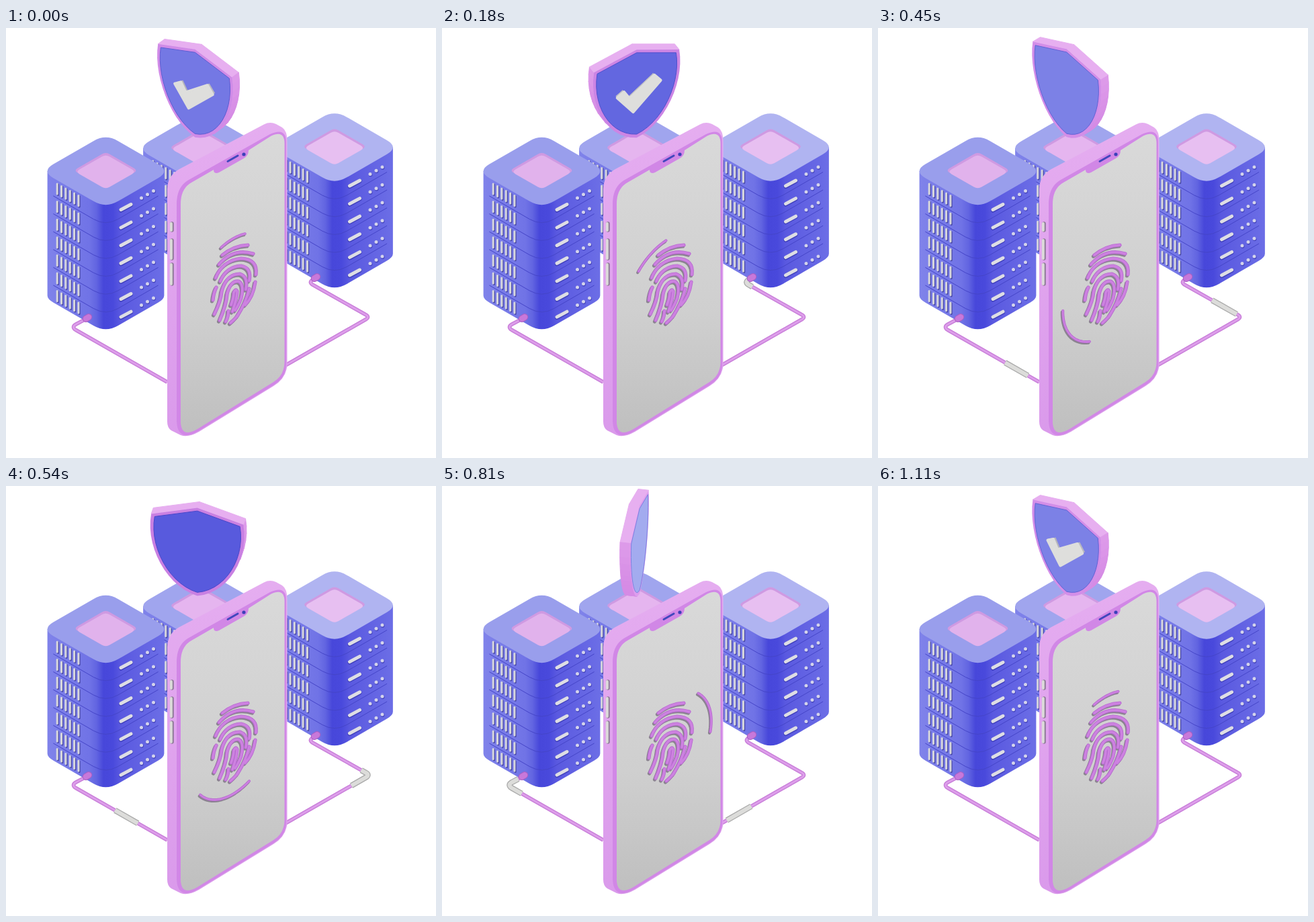
Recreate the animation shown at these times as an HTML page. Size 640 by 640 pixels, loop 1.14 s.

```html
<!DOCTYPE html>
<html lang="en">
<head>
<meta charset="utf-8">
<title>Secure phone and servers</title>
<style>
html, body { margin: 0; width: 100%; height: 100%; overflow: hidden; background: #fff; }
svg { display: block; width: 100vw; height: 100vh; }
</style>
</head>
<body>
<svg id="stage" viewBox="0 0 640 640" fill="none" stroke-linejoin="round">
  <defs>
    <linearGradient id="body">
      <stop offset="0" stop-color="#8083ea"/><stop offset=".36" stop-color="#7073e6"/>
      <stop offset=".42" stop-color="#6265e1"/><stop offset=".48" stop-color="#4747da"/>
      <stop offset=".56" stop-color="#4949dc"/><stop offset=".63" stop-color="#5a59e0"/>
      <stop offset="1" stop-color="#6c6ee6"/>
    </linearGradient>
    <linearGradient id="screen" x2="0" y2="1">
      <stop offset="0" stop-color="#d9d9d9"/><stop offset=".6" stop-color="#cfcfcf"/>
      <stop offset="1" stop-color="#bfbfbf"/>
    </linearGradient>
    <linearGradient id="side" x2="0" y2="1">
      <stop offset="0" stop-color="#e5adf0"/><stop offset="1" stop-color="#da9aeb"/>
    </linearGradient>
  </defs>
  <g id="towers"></g>
  <g id="cables"></g>
  <g id="phone"></g>
  <g id="print"></g>
  <g id="shield"></g>
</svg>
<script>
const LOOP = 1140, STEP = 30, ISO = 0.577;
const $ = id => document.getElementById(id);
const tag = (name, attrs) =>
  `<${name} ${Object.entries(attrs).map(([k, v]) => `${k}="${v}"`).join(' ')}/>`;
const fill = (d, color) => tag('path', { d, fill: color });
const line = (d, color, width, cap = 'round') =>
  tag('path', { d, stroke: color, 'stroke-width': width, 'stroke-linecap': cap });

// ---- server towers ----
function diamond(cx, cy, a, t) {
  const b = a * ISO;
  const c = [[cx - a, cy], [cx, cy - b], [cx + a, cy], [cx, cy + b]];
  const toward = (p, q) => [p[0] + (q[0] - p[0]) * t, p[1] + (q[1] - p[1]) * t];
  return c.map((p, i) =>
    `${i ? 'L' : 'M'}${toward(p, c[(i + 3) % 4])}Q${p} ${toward(p, c[(i + 1) % 4])}`).join('') + 'Z';
}

function tower(cx, cy, layers, topColor, pink) {
  const a = 96, b = a * ISO, t = 0.19, w = a * (1 - t / 2), pitch = 26.6;
  const h = layers * pitch - 1;
  let s = fill(diamond(cx, cy + h, a, t) + `M${cx - w},${cy}H${cx + w}V${cy + h}H${cx - w}Z`, 'url(#body)');
  for (let k = 1; k < layers; k++) {
    const y = cy + k * pitch;
    const seam = `M${cx - a * (1 - t)},${y + b * t}L${cx - a * t},${y + b * (1 - t)}Q${cx},${y + b} ` +
      `${cx + a * t},${y + b * (1 - t)}L${cx + a * (1 - t)},${y + b * t}`;
    s += line(seam, '#4545c8', 1);
  }
  for (let k = 0; k < layers; k++) {
    const y = cy + k * pitch;
    for (let i = 0; i < 6; i++) {
      const x = cx - 72.3 + i * 6.35, top = y + 19 + i * 3.5;
      s += line(`M${x + 1.3},${top + 1}v15.500`, '#4a4aa6', 3) + line(`M${x},${top}v15`, '#d6d6dc', 3);
    }
    s += line(`M${cx + 22.5},${y + 58.5}l15,-8`, '#3f3fba', 6) +
      line(`M${cx + 22.5},${y + 57.5}l15,-8`, '#dedee4', 5);
    for (let i = 0; i < 3; i++) {
      const x = cx + 53 + i * 9, dy = y + 40 - i * 5.3;
      s += tag('circle', { cx: x + 0.6, cy: dy + 1, r: 2.8, fill: '#4343bc' }) +
        tag('circle', { cx: x, cy: dy, r: 2.5, fill: '#d4d4ec' });
    }
  }
  return s + fill(diamond(cx, cy, a, t), topColor) +
    fill(diamond(cx, cy - 1, 48, 0.13), '#cf9ae2') +
    fill(diamond(cx, cy + 1, 45, 0.13), pink);
}
$('towers').innerHTML =
  tower(291, 179, 5, '#a0a5ee', '#e5b5ef') +
  tower(148.5, 213, 7, '#999eec', '#e1b2ec') +
  tower(489, 177.5, 6, '#b0b4f1', '#e7bff1');

// ---- cables with travelling pulses ----
const pulses = [
  { d: 'M240,527L104,449.5Q97,445 104,441L121,432', from: -47.5, span: 256, size: 39 },
  { d: 'M464,370L456,375Q450,379 458,383L535,426.500Q542,430 535,434L417,501.500', from: -14, span: 298, size: 42 }
];
const plug = (x, y) => {
  const d = `M${x - 2},${y + 1.2}L${x + 2},${y - 1.2}`;
  return line(d, '#a95fc4', 10.5) + line(d, '#c878da', 8.5);
};
$('cables').innerHTML =
  pulses.map(p => line(p.d, '#c77bd8', 5.6, 'butt') + line(p.d, '#dd9eea', 3, 'butt')).join('') +
  plug(121, 431.5) +
  pulses.map(p => `<g class="pulse">${line(p.d, '#a9a9a9', 8.5, 'butt')}${line(p.d, '#dcdcda', 6, 'butt')}</g>`).join('') +
  plug(461, 371.5);
const pulseNodes = [...document.querySelectorAll('.pulse')];

// ---- phone ----
const shell = 'M240,240Q240,220 258,210L384,143.5Q393,139 402,143L411,148Q418.500,153 418.500,168' +
  'V500Q418,521 398,533L287,601Q271,610 260,606L246,599Q240,595 240,586Z';
const front = 'M254,262Q254,236 272,226L393,158Q417,147 417,170V500Q417,520 399,531L286,600Q256,617 254,586Z';
const glass = 'M260,262Q260,239 276,230L309,211Q309,218 317,215L354,194Q361,190 361,182' +
  'L394,161Q414.500,151 414.500,172V498Q414,517 398,527L288,595Q262,612 260,588Z';
const button = (y1, y2) => line(`M247,${y1}V${y2}`, '#8d7a96', 5.5) + line(`M245.800,${y1}V${y2}`, '#dcdad9', 4);
$('phone').innerHTML =
  fill(shell, 'url(#side)') + fill(front, '#d187e6') + fill(glass, 'url(#screen)') +
  button(291, 301) + button(316, 343) + button(352, 381) +
  line('M330,198.500L345,190', '#4247bd', 3) +
  tag('circle', { cx: 354, cy: 188, r: 2.6, fill: '#3c40b8' });

// ---- fingerprint ----
const ridges = [
  'M322,338Q339,324 360,323',
  'M317,352Q338,327 368,336',
  'M312,372Q322,346 350,343Q375,344 372,367',
  'M308,405Q309,394 313,386',
  'M319,377Q328,355 350,354Q366,357 362,376',
  'M310,426Q320,406 321,392Q328,366 348,366Q361,370 357,389',
  'M318,435Q328,412 329,396Q334,376 346,377Q355,381 350,402Q346,413 341,420',
  'M327,437Q331,430 331,421',
  'M335,412Q339,401 339,394Q342,387 344,392Q344,402 337,422',
  'M371,378Q368,400 356,412',
  'M362,388Q358,407 344,429',
  'M334,439Q340,434 344,429'
].join('');
const relief = (d, width) =>
  `<g transform="translate(-1.500 2)">${line(d, '#8b8390', width)}</g>` +
  line(d, '#b86ad1', width) + line(d, '#cd82e0', width - 1.8);
$('print').innerHTML = relief(ridges, 5.2) + `<g id="orbit">${relief('', 4)}</g>`;
const orbitNodes = $('orbit').querySelectorAll('path');

function orbitPath(p, ease) {
  const mid = 360 * (0.9 * ease + 0.1 * p);
  const len = 33 + 41 * Math.sin(Math.PI * p) ** 2;
  const pts = [];
  for (let i = 0; i <= 20; i++) {
    const a = (mid + len * (i / 20 - 0.5)) * Math.PI / 180;
    const u = -72.5 * Math.sin(a), v = -72.5 * Math.cos(a);
    pts.push(`${(338 + u * 0.866).toFixed(2)},${(386 + v - u * 0.5).toFixed(2)}`);
  }
  return 'M' + pts.join('L');
}

// ---- shield ----
const turns = [[0, 38], [180, -25], [360, -102], [540, -168.5], [690, -221.5], [930, -291], [1110, -316]];
function turnKey(i) {
  const n = turns.length, lap = Math.floor(i / n), [t, a] = turns[i - lap * n];
  return [t + lap * LOOP, a - lap * 360];
}
function turnAt(t) {
  let i = turns.length - 1;
  while (turns[i][0] > t) i--;
  const [a, b, c, d] = [i - 1, i, i + 1, i + 2].map(turnKey);
  const slope = (p, q) => (q[1] - p[1]) / (q[0] - p[0]);
  const h = c[0] - b[0], x = (t - b[0]) / h, x2 = x * x, x3 = x2 * x;
  return (2 * x3 - 3 * x2 + 1) * b[1] + (x3 - 2 * x2 + x) * h * slope(a, c) +
    (3 * x2 - 2 * x3) * c[1] + (x3 - x2) * h * slope(b, d);
}

const half = [];
for (let i = 0; i <= 14; i++) {
  const s = i / 14, r = 1 - s;
  half.push([70 * r ** 3 + 3 * 79 * r * r * s + 3 * 47 * r * s * s,
    -45 * r ** 3 + 3 * 4 * r * r * s + 3 * 60 * r * s * s + 69 * s ** 3]);
}
const outline = [[0, -62], ...half, ...half.slice(0, -1).reverse().map(([u, v]) => [-u, v])];
const inset = outline.map(([u, v]) => [u * 0.925, v * 0.925]);
const tick = [[-34, -1], [-23, -7], [-14, 5], [27, -20], [37, -10], [-8, 26]];

const mix = (a, b, k) => `rgb(${a.map((x, i) => Math.round(x + (b[i] - x) * k))})`;
const poly = pts => 'M' + pts.map(p => p.map(x => x.toFixed(2)).join()).join('L') + 'Z';

function drawShield(deg) {
  const a = deg * Math.PI / 180, c = Math.cos(a), s = Math.sin(a);
  const facing = c > 0 ? 1 : -1;
  const at = w => ([u, v]) => [286.3 + u * c - w * s, 90 + v + (u * s + w * c) * ISO];
  function extrude(shape, w0, w1, shade) {
    const back = shape.map(at(w0)), face = shape.map(at(w1));
    return shape.map((p, i) => {
      const j = (i + 1) % shape.length, q = shape[j];
      const [A, B, C] = [face[i], face[j], back[i]];
      const area = (B[0] - A[0]) * (C[1] - A[1]) - (B[1] - A[1]) * (C[0] - A[0]);
      if (area * facing >= 0) return '';
      const up = (q[0] - p[0]) / Math.hypot(q[0] - p[0], q[1] - p[1]);
      const color = shade(up);
      return tag('path', { d: poly([A, B, back[j], C]), fill: color, stroke: color, 'stroke-width': 1 });
    }).join('');
  }
  const w = 8 * facing;
  const pinkShade = up => mix([214, 139, 229], [233, 180, 241], Math.max(0, Math.min(1, 0.3 + up * 0.6)));
  let svg = extrude(outline, -w, w, pinkShade) +
    fill(poly(outline.map(at(w))), mix([200, 127, 226], [222, 158, 238], s * s)) +
    tag('path', { d: poly(inset.map(at(w))), fill: mix([85, 87, 220], [166, 174, 240], s * s),
      stroke: mix([70, 68, 200], [128, 130, 226], s * s), 'stroke-width': 1 });
  if (c > 0) {
    const d = poly(tick.map(at(13)));
    svg += extrude(tick, 8, 13, up => mix([158, 158, 168], [196, 196, 202], Math.max(0, up))) +
      tag('path', { d, fill: '#dededc', stroke: '#dededc', 'stroke-width': 4.5 });
  }
  return svg;
}

function render(now) {
  const t = Math.floor((now % LOOP) / STEP) * STEP;
  const p = t / LOOP, ease = (1 - Math.cos(Math.PI * p)) / 2;
  $('shield').innerHTML = drawShield(turnAt(t));
  const d = orbitPath(p, ease);
  orbitNodes.forEach(n => n.setAttribute('d', d));
  pulses.forEach((q, i) => {
    const start = q.from + q.span * ease - q.size / 2;
    pulseNodes[i].setAttribute('stroke-dasharray', `${q.size} 2000`);
    pulseNodes[i].setAttribute('stroke-dashoffset', -start);
  });
}

const begin = performance.now();
function tickFrame() {
  render(performance.now() - begin);
  requestAnimationFrame(tickFrame);
}
tickFrame();
</script>
</body>
</html>
```
